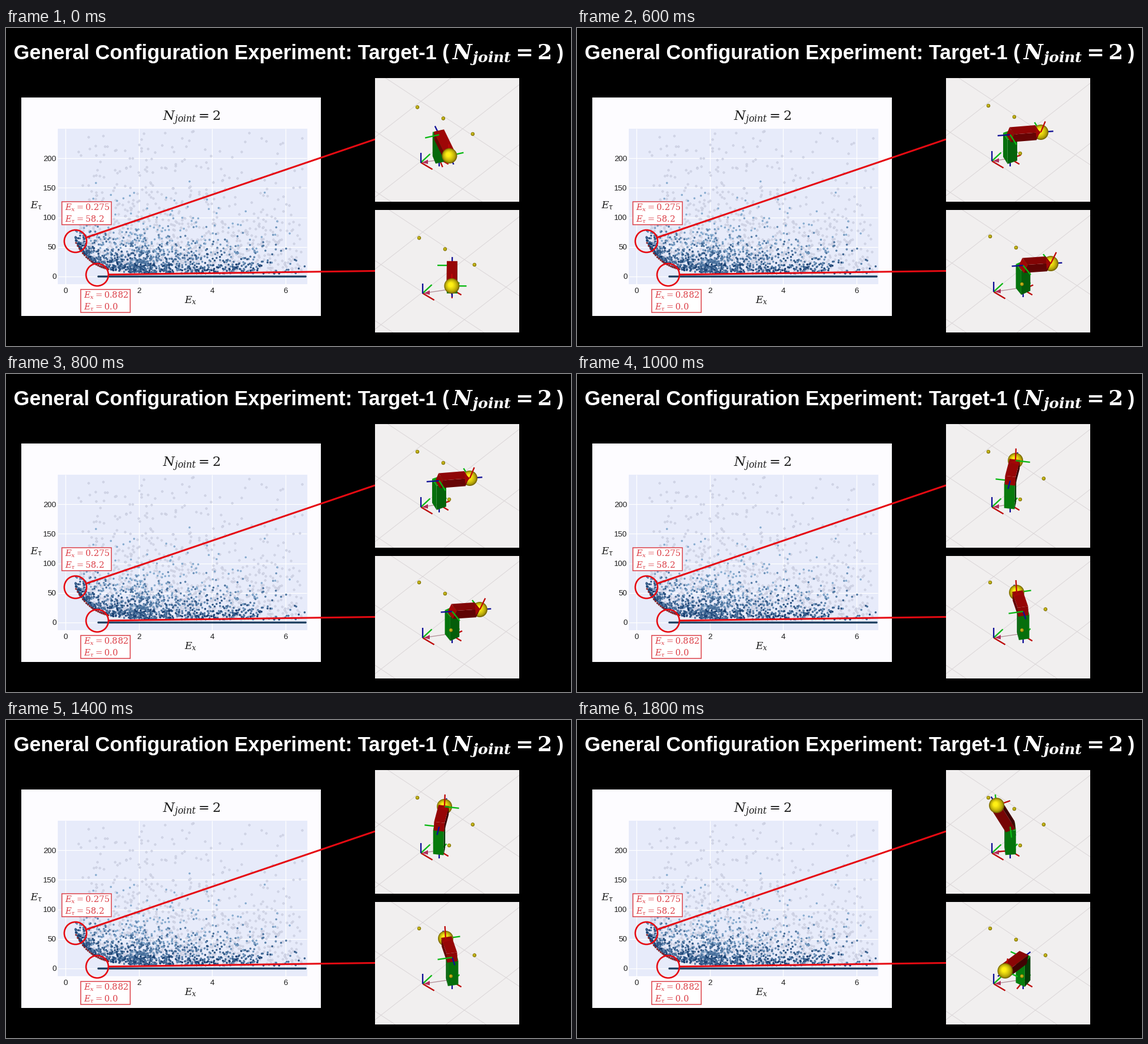
Animation, 960 px wide and 540 px high, one loop 1.9 s. Source, as a matplotlib script:

```python
import itertools
import math

import matplotlib.pyplot as plt
import numpy as np
from matplotlib.animation import FuncAnimation
from matplotlib.patches import Circle, Polygon, Rectangle

W, H, DPI = 960, 540, 100
PX = 72 / DPI  # points per pixel

PANEL, PLOT = "#f1efef", "#e7ebfa"
RED, GREEN, BLUE = np.array([[190, 8, 8], [10, 185, 20], [14, 14, 150]]) / 255
MARK, NOTE, INK = "#e60a12", "#dc4048", "#1c1c1c"

fig = plt.figure(figsize=(W / DPI, H / DPI), dpi=DPI, facecolor="black")
ax = fig.add_axes([0, 0, 1, 1])
ax.set_xlim(0, W)
ax.set_ylim(H, 0)
ax.axis("off")
layer = itertools.count(1)


def shape(patch):
    patch.set_zorder(next(layer))
    return ax.add_patch(patch)


def rect(x0, y0, x1, y1, fill, edge="none", lw=0):
    return shape(Rectangle((x0, y0), x1 - x0, y1 - y0, fc=fill, ec=edge,
                           lw=lw * PX))


def line(p, q, color, lw):
    return ax.plot([p[0], q[0]], [p[1], q[1]], color=color, lw=lw * PX,
                   solid_capstyle="butt", zorder=next(layer))[0]


def text(x, y, s, size, color=INK, **kw):
    kw = {"va": "baseline", "family": "Liberation Sans",
          "math_fontfamily": "dejavuserif", **kw}
    ax.text(x, y, s, fontsize=size * PX, color=color, zorder=next(layer), **kw)


def dots(x, y, color, size, edge="none"):
    ax.scatter(x, y, s=(size * PX) ** 2, c=color, edgecolors=edge,
               linewidths=0.6 * PX, zorder=next(layer))


# ---------- title and chart ----------
def title():
    text(13, 53, "General Configuration Experiment: Target-1 (", 34.7,
         "white", weight="bold")
    text(758, 53, r"$\mathbfit{N}_{\mathbfit{joint}}\mathbf{=}\mathbf{2}$",
         36, "white")
    text(936, 53, ")", 34.7, "white", weight="bold")


def front(x):
    """Lower edge of the cloud, in pixels."""
    return 363 + 54 * (1 - np.exp(-(x - 118) / 28))


def cloud(rng):
    # pale samples reach high up
    x = 122 + 384 * rng.beta(0.95, 1.25, 1000)
    y = front(x) - rng.exponential(75, x.size)
    ok = y > 174
    dots(x[ok], y[ok], "#d6d9e8", 3.3, "#bfc4da")

    # blue samples stay close to the edge and fade upwards
    x = np.concatenate([118 + 390 * rng.beta(1, 1.8, 1080),
                        rng.normal(228, 9, 90)])
    rise = rng.exponential(26, x.size) * np.minimum(1, 0.4 + (x - 118) / 60)
    shade = np.clip(rise / 90 + rng.uniform(-0.2, 0.6, x.size), 0, 1)[:, None]
    color = (1 - shade) * [22, 62, 112] + shade * [135, 172, 208]
    dots(x, front(x) - rise, color / 255, 3.5)

    # zero row and the best samples
    x = np.arange(157, 511, 2.2)
    dots(x, 0 * x + 422, "#173a5c", 3.4)
    x = np.linspace(119, 174, 20)
    dots(x, front(x), "#8c2428", 3.2)


def chart():
    rect(26, 118, 535, 489, "#fdfcff")
    rect(88, 171, 511.5, 435, PLOT)
    for i in range(5):
        y = 422 - 50.25 * i
        line((88, y), (511, y), "white", 1.2)
        text(85.5, y, str(50 * i), 13.2, ha="right", va="center_baseline")
    for i in range(4):
        x = 101 + 124.6 * i
        line((x, 171), (x, 435), "white", 1.2)
        text(x, 445.5, str(2 * i), 13.2, ha="center", va="center_baseline")
    cloud(np.random.default_rng(7))
    text(315, 157, r"$N_{joint}=2$", 22.5, ha="center")
    text(41, 306, r"$E_\tau$", 17)
    text(303, 467, "$E_x$", 17)


def callout(center, end, box, e_x, e_tau):
    """Circle on the chart, line to a view, box with both errors."""
    (cx, cy), (ex, ey), (bx, by) = center, end, box
    a = math.atan2(ey - cy, ex - cx)
    line((cx + 19 * math.cos(a), cy + 19 * math.sin(a)), end, MARK, 3)
    shape(Circle(center, 19, fc="none", ec=MARK, lw=2.6 * PX))
    rect(bx, by, bx + 84, by + 39, "white", NOTE, 1.5)
    text(bx + 5, by + 15.5, f"$E_x={e_x}$", 14.5, NOTE)
    text(bx + 5, by + 34.5, rf"$E_\tau={e_tau}$", 14.5, NOTE)


# ---------- robot views ----------
# Vectors are in view space: x right, y down, z towards the viewer.
AZ, EL = math.radians(38.5), math.radians(48)
CA, SA, CE, SE = math.cos(AZ), math.sin(AZ), math.cos(EL), math.sin(EL)
VIEW = np.array([[CA, SA, 0], [SE * SA, -SE * CA, -CE], [CE * SA, -CE * CA, SE]])
EAST, NORTH, UP = VIEW.T
LIGHT = np.array([-0.25, -0.2, 0.95])
LINK, AXIS, HALF, BALL = 61, 25, 9, 13

ORIGIN = np.array([705, 226])
BASE = np.array([736, 222])
LOWER = np.array([3, 222])  # offset of the lower view
TARGETS = [(753, 213), (793, 177.5), (743, 151), (699, 132)]
TIPS = [[(753.5, 217), (788, 177), (745, 147), (713, 145)],
        [(757.5, 438), (805, 400), (747, 371), (727.5, 426)]]
NEAR = [True, False, False, True]  # is the tip closer than the elbow?


def unit(v):
    return v / np.linalg.norm(v)


def poly(pts, color):
    return shape(Polygon([p[:2] for p in pts], fc=color, ec="none"))


def stick(p, v):
    """Return a function of colour that draws one frame axis."""
    return lambda color: line(p, p + AXIS * v, color, 2.3)


def ball(x, y, r, dark=(125, 108, 0), light=(255, 240, 20)):
    dark, light = np.array(dark), np.array(light)
    parts = []
    for t in np.linspace(0, 1, 7):
        color = (dark + (light - dark) * t ** 0.6) / 255
        center = x - 0.15 * r * t, y - 0.15 * r * t
        parts.append(shape(Circle(center, r * (1 - 0.7 * t), fc=color)))
    return parts


def target(x, y):
    return ball(x, y, 3.2, (118, 104, 0), (205, 190, 30))


def beam(p, q, side, color):
    """Square beam from p to q; only faces turned to the viewer are drawn."""
    along = unit(q - p)
    cross = np.cross(along, side)
    parts = []
    for n, t in [(side, cross), (-side, cross), (cross, side), (-cross, side)]:
        if n[2] > 0:
            a, b = HALF * (n + t), HALF * (n - t)
            glow = 0.3 + 0.7 * max(0, n @ LIGHT)
            parts.append(poly([p + a, p + b, q + b, q + a], color * glow))
    end, face = (q, along) if along[2] > 0 else (p, -along)
    corners = [end + HALF * (i * side + j * cross)
               for i, j in [(1, 1), (1, -1), (-1, -1), (-1, 1)]]
    parts.append(poly(corners, color * (0.3 + 0.7 * max(0, face @ LIGHT))))
    return parts


def floor(shift, clip):
    """Grid, targets and the world frame."""
    o = ORIGIN + shift
    parts = []
    for k, slope in itertools.product((-1, 0, 1), (0.66, -0.78)):
        y = o[1] - 2 + 102 * k
        ray = line((o[0] - 100, y - 100 * slope), (o[0] + 190, y + 190 * slope),
                   "#d9d4d6", 0.9)
        ray.set_clip_path(clip)
        parts.append(ray)
    for t in TARGETS[1:]:
        parts += target(*(t + shift))
    parts.append(line(o, o + (41, -6), "#b09098", 1.3))
    parts.append(poly([o + (2, 0), o + (12, -5), o + (12, 2.5)], "#b0305c"))
    for v, color in [(EAST, RED), (NORTH, GREEN), (UP, BLUE)]:
        parts.append(line(o, o + AXIS * v[:2], color, 2.3))
    return parts


def arm(base, tip, near):
    base = np.append(base, 0.0)
    elbow = base + LINK * UP
    # the hidden depth follows from the fixed link length
    flat = np.array(tip) - elbow[:2]
    depth = math.sqrt(max(0, LINK ** 2 - flat @ flat))
    along = unit(np.append(flat, depth if near else -depth))
    tip = elbow + LINK * along
    side = unit(np.cross(UP, along))
    cross = np.cross(along, side)
    green = side if side[0] > side[1] else -side

    parts = []
    yaw = unit(np.cross(side, UP))
    for v, color in [(EAST, RED), (yaw, RED), (NORTH, GREEN), (-UP, BLUE)]:
        parts.append(stick(base, v * 0.8)(color))
    axes = [(elbow, -along, BLUE), (elbow, -green, GREEN), (tip, along, BLUE),
            (tip, green, GREEN), (tip, cross, RED)]
    for p, v, color in axes:
        if v[2] <= 0:
            parts.append(stick(p, v)(color))
    parts += beam(base, elbow, side, GREEN)
    if near:
        parts += beam(elbow, tip, side, RED)
    else:
        # the beam runs into the ball and ends in a point at its centre
        parts += ball(*tip[:2], BALL)
        stop = tip - 0.75 * BALL * along
        parts += beam(elbow, stop, side, RED)
        normal = unit(np.array([-along[1], along[0], 0])) * HALF
        parts.append(poly([stop + normal, tip, stop - normal], RED * 0.85))
    for p, v, color in axes:
        if v[2] > 0:
            parts.append(stick(p, v)(color))
    if near:
        parts += ball(*tip[:2], BALL)
    return parts


def pose(k):
    sink = (0, 2.5 if k == 0 else 0)  # the first camera sits a bit higher
    parts = []
    for shift, base, tips, clip in zip((0 * LOWER, LOWER),
                                       (BASE, BASE + (22, 222)), TIPS, panels):
        parts += floor(shift + sink, clip)
        parts += arm(base, tips[k], NEAR[k])
        if k:
            parts += target(*(TARGETS[0] + shift))
    return parts


title()
chart()
callout((118, 362), (627, 189), (95, 294.5), "0.275", "58.2")
callout((155, 419), (627, 412.5), (127, 443.5), "0.882", "0.0")
panels = [rect(627, 85, 872, 294.5, PANEL), rect(627, 308.5, 872, 516.5, PANEL)]
poses = [pose(k) for k in range(4)]


def update(i):
    for k, parts in enumerate(poses):
        for part in parts:
            part.set_visible(k == i // 5)
    return []


anim = FuncAnimation(fig, update, frames=19, interval=100, repeat=True,
                     repeat_delay=0, blit=False)
plt.show()
```
